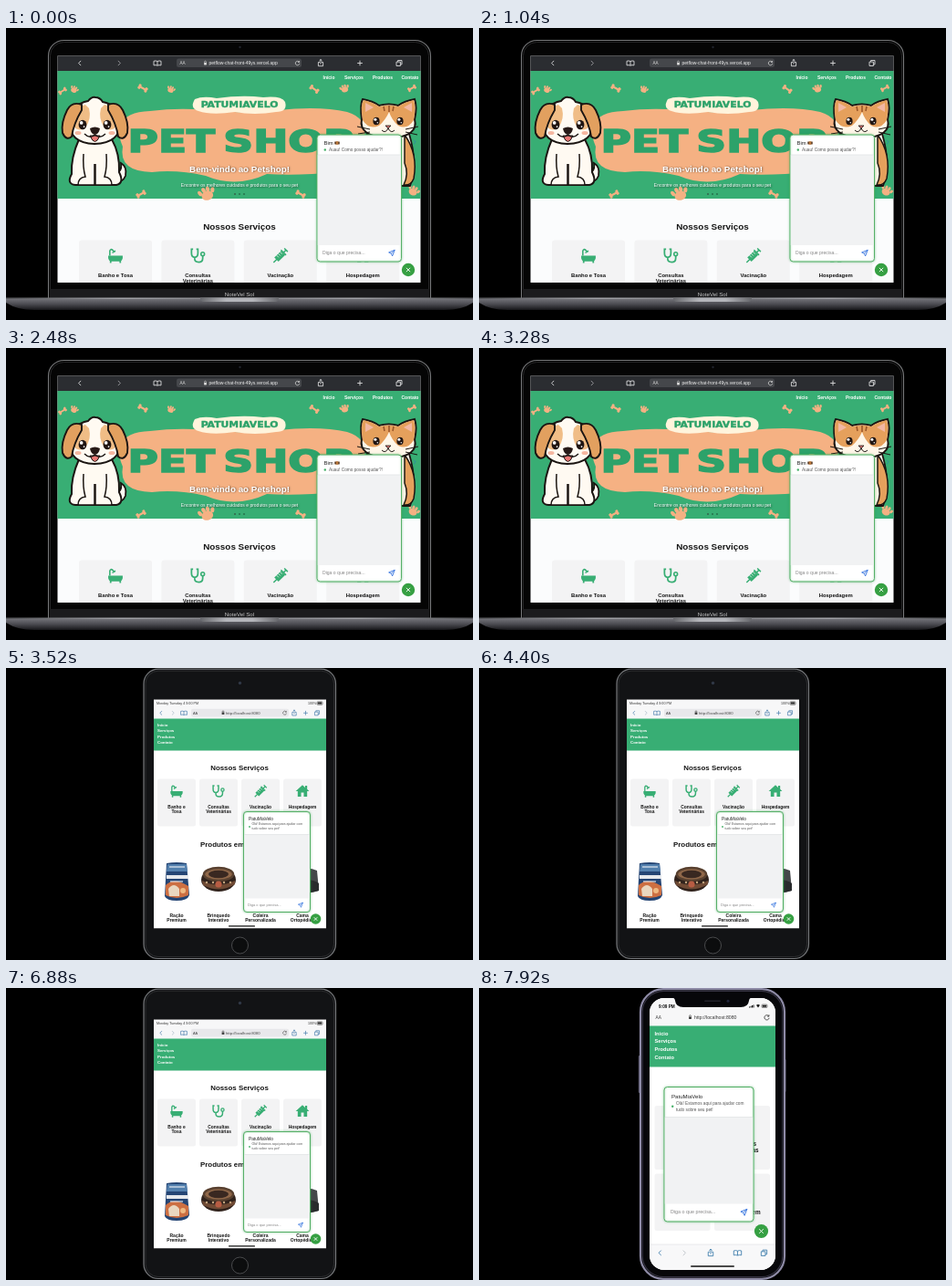
Write an HTML page with a canvas that moves like this. It is 512 by 320 pixels and loops after 8000 ms.

```html
<!DOCTYPE html>
<html lang="pt-BR">
<head>
<meta charset="utf-8">
<title>Pet shop em três telas</title>
<style>
html, body { margin: 0; width: 100%; height: 100%; overflow: hidden; background: #000; }
canvas { display: block; width: 512px; height: 320px; }
</style>
</head>
<body>
<canvas id="stage" width="512" height="320"></canvas>
<script>
const c = document.getElementById('stage').getContext('2d');
const SANS = '"Liberation Sans", Arial, sans-serif';
const WIDE = '"DejaVu Sans", sans-serif';
const GREEN = '#38ae74', PEACH = '#f5b183', INK = '#1b1512', CARD = '#f3f3f4';
const LOOP = 8000, TABLET_AT = 3440, PHONE_AT = 6960;
const BRAND = 'PatuMiaVelo';
const LINKS = ['Início', 'Serviços', 'Produtos', 'Contato'];

function box(x, y, w, h, r, fill, stroke, lw = 1) {
  c.beginPath();
  c.roundRect(x, y, w, h, r);
  paint(fill, stroke, lw);
}

function paint(fill, stroke, lw) {
  if (fill) { c.fillStyle = fill; c.fill(); }
  if (stroke) { c.strokeStyle = stroke; c.lineWidth = lw; c.stroke(); }
}

function oval(x, y, rx, ry, fill, stroke, lw = 1, turn = 0) {
  c.beginPath();
  c.ellipse(x, y, rx, ry, turn, 0, Math.PI * 2);
  paint(fill, stroke, lw);
}

const dot = (x, y, r, fill, stroke, lw) => oval(x, y, r, r, fill, stroke, lw);

function path(d, fill, stroke, lw = 1) {
  const p = new Path2D(d);
  if (fill) { c.fillStyle = fill; c.fill(p); }
  if (stroke) { c.strokeStyle = stroke; c.lineWidth = lw; c.stroke(p); }
}

function gradient(x0, y0, x1, y1, ...colors) {
  const g = c.createLinearGradient(x0, y0, x1, y1);
  colors.forEach((col, i) => g.addColorStop(i / (colors.length - 1), col));
  return g;
}

function text(s, x, y, size, color, { bold = false, align = 'left', font = SANS } = {}) {
  c.font = `${bold ? 'bold ' : ''}${size}px ${font}`;
  c.textAlign = align;
  c.fillStyle = color;
  c.fillText(s, x, y);
}

const title = (s, x, y, size, color = '#151515') => text(s, x, y, size, color, { bold: true, align: 'center' });

function at(x, y, scale, draw, turn = 0) {
  c.save();
  c.translate(x, y);
  c.rotate(turn);
  c.scale(scale, scale);
  draw();
  c.restore();
}

function clipped(x, y, w, h, r, draw) {
  c.save();
  c.beginPath();
  c.roundRect(x, y, w, h, r);
  c.clip();
  draw();
  c.restore();
}

// Service icons, about 18 units wide around the origin
const services = {
  bath() {
    path('M-9 0H9V3Q8 7 5 7H-5Q-8 7 -9 3ZM-7 6h2v3h-2ZM5 6h2v3h-2Z', GREEN);
    path('M-7 0V-6Q-6 -9 -3.5 -7L-2 -5M-4 -3.5L0 -6', null, GREEN, 1.8);
  },
  stethoscope() {
    path('M-6 -8H-8V-3Q-8 2 -4 2Q0 2 0 -3V-8H-2M-4 2V4Q-4 8 1 8Q6 8 6 3V0', null, GREEN, 2);
    dot(6, -2, 2.2, null, GREEN, 1.8);
  },
  syringe() {
    c.save();
    c.rotate(-Math.PI / 4);
    path('M-7 -3.6H5V3.6H-7Z', GREEN);
    path('M-12 0H-6M5 0H10M10 -3V3M5.5 -4.5V4.5', null, GREEN, 1.7);
    path('M-3 -3.6V0M0 -3.6V0M3 -3.6V0', null, CARD, 0.9);
    c.restore();
  },
  house() {
    path('M-10 0L0 -9L4 -5.5V-8H7V-3L10 0H7V8H2V2H-2V8H-7V0Z', GREEN);
  }
};
const SERVICES = [
  ['bath', 'Banho e', 'Tosa'],
  ['stethoscope', 'Consultas', 'Veterinárias'],
  ['syringe', 'Vacinação', ''],
  ['house', 'Hospedagem', '']
];

// Browser glyphs
const glyphs = {
  back: 'M1.2 -2.6L-1.4 0L1.2 2.6',
  next: 'M-1.2 -2.6L1.4 0L-1.2 2.6',
  book: 'M0 -2Q-2 -3 -4 -2.2V2.4Q-2 1.8 0 2.6Q2 1.8 4 2.4V-2.2Q2 -3 0 -2V2.6',
  share: 'M-1 -1H-2.6V3.2H2.6V-1H1M0 1.2V-4M-1.5 -2.6L0 -4L1.5 -2.6',
  plus: 'M-2.8 0H2.8M0 -2.8V2.8',
  tabs: 'M-3 -1.4H1.4V3H-3ZM-1.4 -1.4V-3H3V1.4H1.4',
  reload: 'M2.2 -1.4A2.6 2.6 0 1 0 2.6 .5M2.4 -3V-1.2H.6'
};
const glyph = (name, x, y, color, scale = 1) =>
  at(x, y, scale, () => path(glyphs[name], null, color, 0.85));

function lock(x, y, color) {
  box(x - 1.4, y - 0.6, 2.8, 2.5, 0.4, color);
  path(`M${x - 0.9} ${y - 0.5}V${y - 1.4}a.9 .9 0 0 1 1.8 0V${y - 0.5}`, null, color, 0.6);
}

function closeButton(x, y, r) {
  dot(x, y, r, '#36a043');
  const d = r * 0.3;
  path(`M${x - d} ${y - d}L${x + d} ${y + d}M${x + d} ${y - d}L${x - d} ${y + d}`, null, '#fff', 0.9);
}

function chat({ x, y, w, h, head, foot, pad }) {
  c.save();
  c.shadowColor = 'rgba(40,160,70,.45)';
  c.shadowBlur = 2.5;
  box(x, y, w, h, 3.5, '#fff', '#57b068', 1);
  c.restore();
  box(x + 0.8, y + head, w - 1.6, h - head - foot, 0, '#f1f2f3');
  path(`M${x + 1} ${y + head}H${x + w - 1}`, null, '#dfe1e3', 0.7);
  text('Diga o que precisa...', x + pad, y + h - foot * 0.44, w / 18.2, '#858585');
  at(x + w - 10.5, y + h - foot * 0.53, w / 93, () =>
    path('M3.2 -3.2L-3.4 -.5L-.6 .7L.6 3.5ZL-.6 .7', null, '#3775df', 0.9));
}

function paw(x, y, s, turn) {
  at(x, y, s, () => {
    oval(0, 2, 4.6, 3.6, PEACH);
    for (let i = -1.5; i <= 1.5; i++) oval(i * 3.4, -3.6 + Math.abs(i) * 1.6, 1.5, 2.2, PEACH, null, 1, i * 0.25);
  }, turn);
}

function bone(x, y, s, turn) {
  at(x, y, s, () => {
    box(-5, -1.3, 10, 2.6, 1, PEACH);
    for (const k of [-1, 1]) { dot(k * 5, -1.6, 2, PEACH); dot(k * 5, 1.6, 2, PEACH); }
  }, turn);
}

function eye(x, y, rx, ry) {
  oval(x, y, rx, ry, '#201512');
  dot(x - rx * 0.3, y - ry * 0.4, rx * 0.42, '#fff');
  dot(x + rx * 0.35, y + ry * 0.4, rx * 0.2, '#fff');
}

function mirrored(axis, draw) {
  draw();
  c.save();
  c.translate(axis * 2, 0);
  c.scale(-1, 1);
  draw();
  c.restore();
}

function dog() {
  const fur = '#fffaf2', tan = '#e2a05f';
  path('M118 160Q128 158 126 148Q133 152 131 162Q128 170 117 169Z', fur, INK, 1.8);
  path('M80 122Q71 142 72 160Q66 171 76 172H121Q130 170 124 158Q125 138 116 122Z', fur, INK, 2);
  path('M85 138Q84 153 87 163Q79 164 79 172H97V149M110 138Q111 153 108 163Q116 164 116 172H98V149', fur, INK, 1.5);
  path('M98 76Q94 75 90 80Q72 83 70 103Q69 126 97 127Q126 126 125 103Q123 84 106 81Q103 76 98 76Z', fur, INK, 2);
  mirrored(97.5, () => {
    path('M87 84Q73 88 72 104Q78 116 87 109Q94 100 91 88Z', '#f0bd86');
    path('M83 84Q72 80 67 90Q60 104 62 115Q66 124 72 119Q74 105 83 90Z', tan, INK, 1.9);
    oval(79, 115, 3.5, 2, '#f5b6a0');
  });
  eye(84, 106, 4.4, 5.2);
  eye(111, 106, 4.4, 5.2);
  path('M92 118Q97.5 131 103 118Z', '#e97874', INK, 1);
  path('M86 116Q92 122 97.5 117Q103 122 109 116', null, INK, 1.4);
  path('M92 110Q97.5 107 103 110Q102 116 97.5 117Q93 116 92 110Z', '#271a17');
}

function cat() {
  const fur = '#fff6e8', tan = '#e5a05c';
  path('M396 116Q388 150 394 173H443Q452 150 442 116Z', fur, INK, 1.8);
  path('M437 117Q452 138 447 165Q444 173 436 172Q442 160 437 148Z', tan, INK, 1.5);
  path('M390 100Q388 84 391 78Q402 80 409 85Q420 82 430 85Q437 80 448 78Q451 86 448 100Q453 119 420 121Q386 119 390 100Z', fur, INK, 2);
  path('M391 101Q388 84 392 79Q402 81 409 86Q420 83 430 86Q437 81 447 79Q450 86 447 101Q440 112 430 107Q423 101 420 92Q416 101 409 107Q398 112 391 101Z', tan);
  mirrored(419.5, () => path('M394 92L394 82L403 87Z', '#f2b7a4'));
  path('M414 86L415 91M420 85V92M425 86L424 91', null, '#9b572a', 1.6);
  eye(406, 102, 3.6, 4.3);
  eye(432, 102, 3.6, 4.3);
  path('M416 107H422L419 110Z', '#d97572', INK, 0.8);
  path('M412 112Q416 116 419 110Q422 116 426 112M399 111L385 108M399 114L386 116M438 111L452 108M438 114L451 117', null, INK, 1);
}

// Extended display lettering for the banner artwork
function expanded(s, x, y, size) {
  const ink = '#2da26a';
  c.save();
  c.translate(x, y);
  c.scale(1.34, 1);
  c.wordSpacing = '-5px';
  text(s, 0, 0, size, ink, { bold: true, align: 'center', font: WIDE });
  c.strokeStyle = ink;
  c.lineWidth = size * 0.045;
  c.strokeText(s, 0, 0);
  c.restore();
}

function banner() {
  box(56, 47, 399, 140, 0, GREEN);
  [[75, 67, 0.7, 0.5], [181, 67, 0.7, 0.4], [220, 181, 1.4, -0.3], [371, 66, 0.8, -0.3], [447, 178, 1, 0.5]]
    .forEach(p => paw(...p));
  [[62, 69, 0.7, -0.6], [150, 66, 0.8, 0.5], [338, 67, 0.8, 0.6], [445, 66, 0.7, -0.5], [148, 182, 0.8, -0.5], [323, 182, 0.8, 0.5]]
    .forEach(p => bone(...p));
  path('M126 106Q131 92 158 91Q182 88 206 89Q252 95 298 90Q344 85 374 92Q397 99 393 120Q397 151 363 158Q320 162 286 160Q252 176 219 162Q188 155 160 158Q123 157 128 130Q122 117 126 106Z', PEACH);
  path('M207 78Q216 74 231 77Q259 73 282 76Q302 74 306 81Q309 92 296 92Q272 96 251 92Q225 96 211 91Q201 88 207 78Z', '#fff4dc');
  expanded(BRAND.toUpperCase(), 256, 87, 8.1);
  expanded('PET SHOP', 257.5, 135.5, 34);
  dog();
  cat();
  c.save();
  c.shadowColor = 'rgba(0,0,0,.55)';
  c.shadowBlur = 2;
  c.shadowOffsetX = c.shadowOffsetY = 0.8;
  title('Bem-vindo ao Petshop!', 256, 157.5, 9.85, '#fff');
  text('Encontre os melhores cuidados e produtos para o seu pet', 256, 174, 5, '#fff', { align: 'center' });
  c.restore();
  [251, 256, 261].forEach((x, i) => dot(x, 182, 1.1, i ? '#26764f' : '#34684f'));
  glyph('next', 448, 125, '#2c82ad', 0.9);
}

function laptop() {
  box(46.5, 13.5, 419, 290, [17, 17, 0, 0], '#050505', '#77787a', 1.1);
  box(48.5, 15.5, 415, 286, [15, 15, 0, 0], null, '#242425', 1);
  box(48, 286, 416, 10, 0, '#1b1b1d');
  dot(256.5, 21, 1.2, '#20242c');
  clipped(56.5, 30.5, 398, 248.5, 0, () => {
    box(56, 30, 399, 249, 0, '#fbfcfd');
    box(56, 30, 399, 17, 0, '#2b2d31');
    box(187, 33.5, 137, 9.5, 2.5, '#45474b');
    const bar = { back: 81, next: 124, book: 166, share: 345, plus: 388, tabs: 431 };
    for (const name in bar) glyph(name, bar[name], 38.5, name === 'next' ? '#a5a5a9' : '#e4e4e6');
    glyph('reload', 319.5, 38.5, '#ddd', 0.85);
    text('AA', 190.5, 40.3, 4.6, '#ddd');
    lock(218.5, 38.5, '#ddd');
    text('petflow-chat-front-49ys.vercel.app', 222.5, 40.2, 5, '#f1f1f1');
    banner();
    [347.5, 371, 402, 433.5].forEach((x, i) => text(LINKS[i], x, 56.3, 5, '#fff', { bold: true }));
    title('Nossos Serviços', 256, 220.5, 9.9);
    SERVICES.forEach(([icon, a, b], i) => {
      const x = 120 + i * 90.4;
      box(x - 40, 232.5, 80, 60, 3, CARD);
      at(x, 249.5, 0.88, services[icon]);
      title(i ? a : a + ' ' + b, x, 273, 5.9);
      if (i) title(b, x, 279, 5.9);
    });
  });
  chat({ x: 341, y: 117, w: 92.5, h: 139, head: 22, foot: 18, pad: 6 });
  text('Bim', 348.5, 128, 5.9, '#222');
  dot(363, 126, 2.1, '#b9783d');
  oval(361, 126, 0.8, 1.8, '#53351f');
  oval(365, 126, 0.8, 1.8, '#53351f');
  dot(349.8, 133.5, 1.2, '#46b068');
  text('Auau! Como posso ajudar?!', 354, 135.3, 4.75, '#555');
  closeButton(441, 265, 7.2);
  text('NoteVel Sol', 256, 293.8, 6.2, '#c4c4c4', { align: 'center' });

  path('M0 296H512V301Q500 309 481 309H31Q12 309 0 301Z', gradient(0, 296, 0, 309, '#77777d', '#4c4c52', '#17171a'));
  box(0, 295.5, 512, 1.6, 0, gradient(0, 0, 512, 0, '#55565a', '#a2a3a8', '#7c7d82', '#a2a3a8', '#55565a'));
  box(213, 295.5, 86, 4.4, [0, 0, 4, 4], gradient(213, 0, 299, 0, '#66676b', '#b4b5ba', '#b4b5ba', '#66676b'));
}

function battery(x, y) {
  box(x, y - 1.7, 6, 3.4, 0.8, null, '#222', 0.5);
  box(x + 0.7, y - 1, 4.5, 2, 0.3, '#222');
}

function bag() {
  path('M176 214Q187 212 198 214L201 249Q199 255 187 255Q176 255 174 250Z', '#254574');
  path('M177 215H198L199 223H176Z', '#527fad');
  path('M176 227H200V231H176Z', '#e7e9ed');
  path('M175 238Q184 229 200 239L200 249Q187 255 175 249Z', '#cd6f42');
  path('M178 242Q184 234 190 242V250H179Z', '#ead7c0');
  dot(194, 244, 3, '#efb982');
  path('M179 218H196M180 234H194', null, '#fff', 1.2);
}

function productRing() {
  oval(233, 232, 19, 13, '#30221c');
  oval(233, 226, 16, 7, '#8f6749', '#58402f', 2.5);
  oval(233, 226, 11, 4.2, '#392821');
  path('M215 233Q232 242 251 233V237Q234 247 216 238Z', '#704b35');
  [220, 227, 239, 246].forEach(x => dot(x, 235, 1.2, '#c1a37d'));
  dot(233, 237, 3.6, '#b75c43');
}

function tablet() {
  box(151, 1.2, 210.5, 317.3, 16, '#121315', '#77797c', 1.2);
  box(153, 3.2, 206.5, 313.3, 14, null, '#2b2c2e', 1);
  dot(256.5, 16.5, 1.7, '#303846');
  dot(256.5, 304, 9, '#0c0d0e', '#494a4c', 1);
  clipped(162, 34.5, 189, 251, 0, () => {
    box(162, 34.5, 189, 251, 0, '#fff');
    box(162, 34.5, 189, 21, 0, '#f7f7f8');
    text('Monday Tuesday 4 9:00 PM', 165, 40, 3.7, '#333');
    battery(341, 38.6);
    text('100%', 331, 40, 3.6, '#333');
    box(203, 44.8, 107, 8.8, 2, '#e8e8eb');
    const bar = { back: 170, next: 183, book: 195, share: 316, plus: 328.5, tabs: 341 };
    for (const name in bar) glyph(name, bar[name], 49.3, name === 'next' ? '#aab8c6' : '#4c7fae', 0.85);
    text('AA', 205, 51, 3.9, '#444');
    lock(238, 49.2, '#444');
    text('http://localhost:8080', 241, 51, 4.2, '#444');
    glyph('reload', 305.5, 49.2, '#555', 0.75);
    box(162, 55.5, 189, 35, 0, GREEN);
    LINKS.forEach((s, i) => text(s, 166, 63.8 + i * 6.5, 4.4, '#fff', { bold: true }));
    title('Nossos Serviços', 256, 111.5, 7.9);
    const x0 = 187, step = 46;
    SERVICES.forEach(([icon, a, b], i) => {
      const x = x0 + i * step;
      box(x - 21, 121.5, 42, 52, 2.5, CARD);
      at(x, 135, 0.74, services[icon]);
      title(a, x, 154, 4.9);
      title(b, x, 159.4, 4.9);
    });
    title('Produtos em Destaque', 256, 195.5, 7.9);
    bag();
    productRing();
    path('M317 224Q329 216 341 222L343 244Q329 249 317 245Z', '#45474a');
    path('M320 235Q333 229 343 236V244Q331 248 319 243Z', '#292b2d');
    [['Ração', 'Premium'], ['Brinquedo', 'Interativo'], ['Coleira', 'Personalizada'], ['Cama', 'Ortopédica']]
      .forEach(([a, b], i) => {
        title(a, x0 + i * step, 273, 5);
        title(b, x0 + i * step, 278.4, 5);
      });
    box(244, 282.2, 29, 1.3, 0.6, '#111');
  });
  chat({ x: 260.5, y: 157.5, w: 73, h: 110, head: 25, foot: 15, pad: 4.5 });
  text(BRAND, 266, 166.8, 4.8, '#222');
  dot(267, 174, 0.9, '#46b068');
  text('Olá! Estamos aqui para ajudar com', 269.5, 172.3, 3.55, '#555');
  text('tudo sobre seu pet!', 269.5, 177.2, 3.55, '#555');
  closeButton(339.5, 275, 5.8);
}

function phone() {
  box(174.8, 74, 2.5, 41, 1, '#57556a');
  box(334.5, 78, 2, 36, 1, '#57556a');
  box(177, 1.2, 158, 317.6, 25, '#07070a', '#8e8ba6', 2.2);
  box(179.2, 3.4, 153.6, 313.2, 23, null, '#353342', 1.2);
  clipped(187, 11, 138, 298, 16, () => {
    box(187, 11, 138, 298, 0, '#fff');
    box(187, 11, 138, 30.5, 0, '#f7f7f8');
    text('9:09 PM', 197, 21.5, 4.7, '#111', { bold: true });
    [0, 1, 2, 3].forEach(i => box(296 + i * 1.5, 20.5 - i * 0.7, 1, 1 + i * 0.7, 0, '#111'));
    path('M304 18.8Q306 17 308 18.8L306 21.5Z', '#111');
    battery(310, 19.8);
    text('AA', 193.5, 34, 4.7, '#333');
    lock(231.5, 32, '#333');
    text('http://localhost:8080', 236, 34.1, 5.2, '#333');
    glyph('reload', 315.5, 32.3, '#333');
    box(187, 41.5, 138, 45, 0, GREEN);
    LINKS.forEach((s, i) => text(s, 192.5, 51.7 + i * 8.75, 5.7, '#fff', { bold: true }));
    title('Nossos Serviços', 256, 117, 10);
    SERVICES.forEach(([icon, a, b], i) => {
      const x = i % 2 ? 288.5 : 223, y = i < 2 ? 129 : 203.5;
      box(x - 30.5, y, 61, i < 2 ? 70 : 62.5, 2.5, CARD);
      at(x, y + 19, 0.9, services[icon]);
      title(a, x, y + 44, 6.4);
      title(b, x, y + 51, 6.4);
    });
    box(187, 281, 138, 28, 0, '#f8f8f9');
    path('M187 281H325', null, '#dedee1', 0.6);
    const bar = { back: 198.5, next: 225, share: 254, book: 283.5, tabs: 312.5 };
    for (const name in bar) glyph(name, bar[name], 290.3, name === 'next' ? '#b9bec5' : '#407fae', 1.05);
    box(232, 304.2, 48, 1.6, 0.8, '#111');
  });
  path('M211 10H300Q296 11 296 14Q295 21 287 21H224Q216 21 215 14Q215 11 211 10Z', '#07070a');
  box(247, 13.5, 18, 1.6, 0.8, '#22222a');
  dot(273, 14.3, 1.5, '#20243a');
  chat({ x: 203, y: 108.5, w: 98, h: 147.5, head: 33, foot: 19.5, pad: 7 });
  text(BRAND, 211, 121, 6.1, '#222');
  dot(212.2, 129.8, 1.2, '#46b068');
  text('Olá! Estamos aqui para ajudar com', 216, 128.4, 4.75, '#555');
  text('tudo sobre seu pet!', 216, 135, 4.75, '#555');
  closeButton(309.5, 266.5, 7.6);
}

let shown = null;
function tick(now) {
  const t = now % LOOP;
  const scene = t < TABLET_AT ? laptop : t < PHONE_AT ? tablet : phone;
  if (scene !== shown) {
    c.fillStyle = '#000';
    c.fillRect(0, 0, 512, 320);
    scene();
    shown = scene;
  }
  requestAnimationFrame(tick);
}
tick(performance.now());
</script>
</body>
</html>
```
